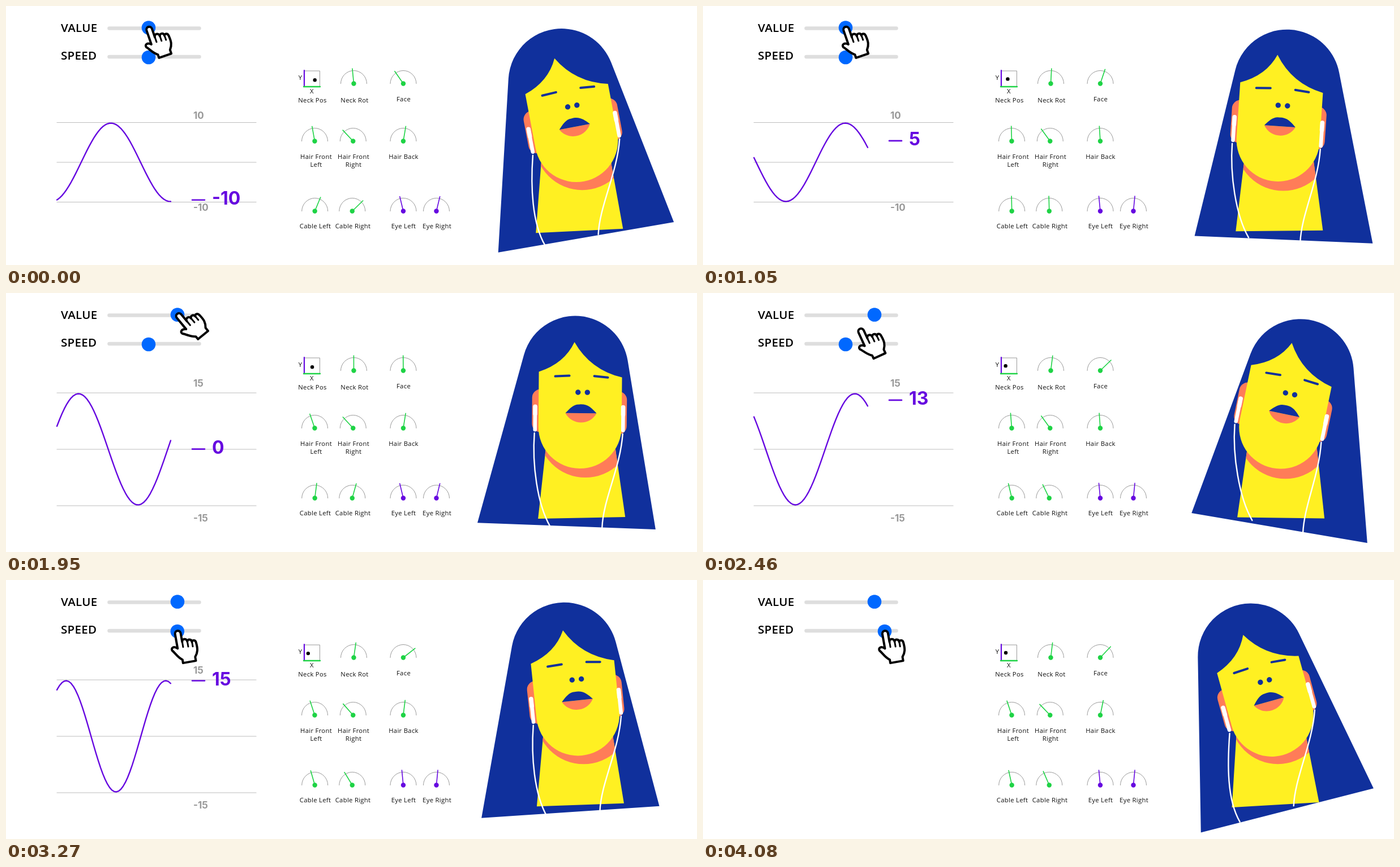
Animation of 1221x459 px, one loop 4110 ms. Source, as an HTML page with a canvas:

```html
<!DOCTYPE html>
<html>
<head>
<meta charset="utf-8">
<title>Sine rig</title>
<style>
html, body { margin: 0; width: 100%; height: 100%; overflow: hidden; background: #fff; }
canvas { display: block; }
</style>
</head>
<body>
<canvas id="stage" width="1221" height="459"></canvas>
<script>
const ctx = document.getElementById('stage').getContext('2d');
const LOOP = 4110, STEP = 30, TAU = Math.PI * 2, DEG = Math.PI / 180;
const OMEGA = TAU / 1533, BOOST = 0.36, GRAPH_END = 3960;
const VALUE_LAG = 0.17, HEAD_LAG = 0.08;
const BLUE = '#10309c', YELLOW = '#fff022', ORANGE = '#ff7c58';
const GREEN = '#1ed345', PURPLE = '#6608e0', DOT = '#0068ff';

const { sin, cos, round, max, min } = Math;
const lerp = (a, b, p) => a + (b - a) * p;
const clamp = x => max(0, min(1, x));
const ease = (t, from, to) => (1 - cos(Math.PI * clamp((t - from) / (to - from)))) / 2;

function fill(color, path) {
  ctx.beginPath();
  path();
  ctx.fillStyle = color;
  ctx.fill();
}

function stroke(color, width, path) {
  ctx.beginPath();
  path();
  ctx.strokeStyle = color;
  ctx.lineWidth = width;
  ctx.stroke();
}

function poly(...xy) {
  for (let i = 0; i < xy.length; i += 2) ctx.lineTo(xy[i], xy[i + 1]);
}

const line = (color, width, ...xy) => stroke(color, width, () => poly(...xy));
const disc = (color, x, y, r) => fill(color, () => ctx.arc(x, y, r, 0, TAU));

function text(str, x, y, font, color = '#111', align = 'left', spacing = 0) {
  ctx.font = font;
  ctx.fillStyle = color;
  ctx.textAlign = align;
  ctx.letterSpacing = spacing + 'px';
  ctx.fillText(str, x, y);
}

const label = (str, x, y) =>
  text(str, x, y, '11.3px "Open Sans", sans-serif', '#111', 'center', 0.3);

function placed(x, y, degrees, draw) {
  ctx.save();
  ctx.translate(x, y);
  ctx.rotate(degrees * DEG);
  draw();
  ctx.restore();
}

// All rig values at one moment; each part counts the speed boost from its own origin.
function pose(t) {
  const speed = ease(t, 2950, 3560);
  const phase = origin => OMEGA * (t + 5 + BOOST * speed * (t - origin));
  const amp = lerp(10, 15, ease(t, 1450, 1900));
  const wave = phase(0), head = phase(2720), hair = phase(1800);
  return {
    t, speed, amp, wave, hair,
    value: -amp * cos(wave - VALUE_LAG),
    tilt: -amp * cos(head - HEAD_LAG) - 0.7,
    sway: amp * sin(head + 0.25),
  };
}

function slider(name, x, y, dotY, baseline) {
  text(name, 97, baseline, '600 20.5px "Open Sans", sans-serif', '#000', 'left', 0.3);
  line('#dedede', 6.5, 182.5, y, 341.5, y);
  disc(DOT, x, dotY, 12.3);
}

function hand(x, y, angle) {
  placed(x, y, angle, () => {
    const path = () => {
      ctx.moveTo(-5, 31);
      ctx.lineTo(-5, 5);
      ctx.arc(0, 5, 5, Math.PI, 0);
      ctx.lineTo(5, 21);
      ctx.bezierCurveTo(5, 15, 14, 15, 14, 22);
      ctx.bezierCurveTo(15, 17, 22, 18, 22, 24);
      ctx.bezierCurveTo(23, 20, 29, 21, 29, 27);
      ctx.bezierCurveTo(30, 38, 29, 44, 23, 51);
      ctx.lineTo(23, 58);
      ctx.lineTo(0, 58);
      ctx.lineTo(0, 52);
      ctx.bezierCurveTo(-8, 46, -10, 39, -15, 33);
      ctx.bezierCurveTo(-17, 28, -11, 25, -5, 31);
      ctx.closePath();
    };
    fill('#fff', path);
    stroke('#000', 4, path);
    line('#000', 3, 5, 20, 5, 30);
    line('#000', 3, 14, 22, 14, 31);
    line('#000', 3, 22, 24, 22, 32);
  });
}

function controls({ t }) {
  const valueX = lerp(252, 303, ease(t, 1150, 1870));
  const speedX = lerp(252, 321, ease(t, 2830, 3500));
  const switched = ease(t, 2230, 2690);
  slider('VALUE', valueX, 39.5, 38.5, 45.5);
  slider('SPEED', speedX, 90, 91, 95);
  hand(lerp(valueX - 0.5, speedX, switched), lerp(37, 90, switched),
    lerp(-19 - 0.4 * (valueX - 252), -10, switched));
}

function graph({ t, speed, amp, wave, value }) {
  if (t >= GRAPH_END) return;
  const mid = 277, grown = (amp - 10) / 5, height = lerp(70.5, 100, grown);
  for (const y of [mid - height, mid, mid + height]) line('#bdbdbd', 1.2, 90, y, 442, y);

  const bold = '700 17px Inter, sans-serif', limit = round(amp);
  text(limit, 331, mid - height - lerp(6.5, 11.5, grown), bold, '#999');
  text(-limit, 331, mid + height + lerp(15.5, 27.5, grown), bold, '#999');

  stroke(PURPLE, 2.4, () => {
    const k = TAU / 210 * (1 + BOOST * speed);
    for (let x = 291; x > 86; x -= 4) {
      const px = max(90, x);
      ctx.lineTo(px, mid + height * 0.985 * cos(wave - (291 - px) * k));
    }
  });

  const y = mid - 1.5 - height * 0.98 * value / amp;
  line(PURPLE, 2.6, 329, y, 351, y);
  text(Math.trunc(value * 1.012) || 0, 364, y + 8.5, '700 32px Inter, sans-serif', PURPLE);
}

function gauge(x, y, angle, color = GREEN) {
  stroke('#999', 1, () => ctx.arc(x, y, 23, Math.PI, 0));
  placed(x, y, angle, () => line(color, 1.6, 0, 0, 0, -26.5));
  disc(color, x, y, 4.2);
}

function gauges({ wave, hair, value, speed }) {
  line('#999', 1, 527, 115, 554.5, 115, 554.5, 143);
  line(PURPLE, 2.2, 527, 114, 527, 143);
  line(GREEN, 2.4, 526, 143, 555, 143);
  disc('#000', 541 - 0.48 * value, 131 + 2 * cos(2 * wave - 4.88), 3.2);
  label('Y', 520, 131);
  label('X', 540.5, 155);

  gauge(614.5, 137.5, 0.55 * value);
  gauge(702, 137.5, 3.5 * value);

  const c = cos(hair), s = sin(hair);
  gauge(545.5, 239.5, -10 - 9 * s);
  gauge(613.3, 239.5, -40 - 3 * c - 3 * s);
  gauge(702, 239.5, 4 + 5.5 * c + 6 * s);

  gauge(545.7, 363.5, 7 - 1.55 * value);
  gauge(611.8, 363.5, 15 - 3.1 * value);

  const blink = ease(cos(wave - 0.87), 0.3, 0.64) * (1 - speed);
  const eye = 5.5 + 8 * blink;
  gauge(702, 363.5, -eye, PURPLE);
  gauge(760.5, 363.5, eye, PURPLE);

  label('Neck Pos', 541.5, 171);
  label('Neck Rot', 616, 171);
  label('Face', 702.5, 168.5);
  label('Hair Front', 548, 271);
  label('Left', 548, 285);
  label('Hair Front', 614, 271);
  label('Right', 614, 285);
  label('Hair Back', 702.5, 271);
  label('Cable Left', 546.5, 394);
  label('Cable Right', 613, 394);
  label('Eye Left', 702.5, 394);
  label('Eye Right', 761.5, 394);
}

// Hull of the skull circle and the two swinging hem corners.
function hairBack({ tilt, sway }) {
  const r = 94;
  const cx = 1014 + 2.85 * tilt - 0.7 * sway;
  const cy = 134.5 + 0.25 * tilt + 0.02 * tilt * tilt;
  const hemX = 1014.5 - 1.4 * tilt - 1.7 * sway, hemY = 413 + 0.3 * tilt;
  const hem = (0.95 * tilt + 0.12 * sway) * DEG;
  const dx = 157.5 * cos(hem), dy = 157.5 * sin(hem);
  const tangent = (x, y, side) =>
    Math.atan2(y - cy, x - cx) + side * Math.acos(r / Math.hypot(x - cx, y - cy));
  fill(BLUE, () => {
    ctx.arc(cx, cy, r, tangent(hemX - dx, hemY - dy, 1), tangent(hemX + dx, hemY + dy, -1));
    poly(hemX + dx, hemY + dy, hemX - dx, hemY - dy);
  });
}

function neck({ tilt }, shadow) {
  const top = 1015 + 0.7 * tilt, base = 1017 + 0.35 * tilt;
  const slope = 77 * sin((0.15 * tilt - 1.1) * DEG);
  const path = () => poly(top - 62, 280, top - 50, 200, top + 50, 200, top + 62, 280,
    base + 77, 398.5 + slope, base - 77, 398.5 - slope);
  fill(YELLOW, path);
  ctx.save();
  ctx.beginPath();
  path();
  ctx.clip();
  disc(ORANGE, ...shadow, 84);
  ctx.restore();
}

function face() {
  fill(YELLOW, () => {
    ctx.moveTo(-75, -73);
    ctx.quadraticCurveTo(-30, -88, -12.5, -126);
    ctx.quadraticCurveTo(16, -77, 72, -64);
    ctx.lineTo(72, 24.5);
    ctx.arc(-1.5, 24.5, 73.5, 0, Math.PI);
  });
  line(BLUE, 4, -46, -65, -21, -66.3);
  line(BLUE, 4, 23, -66, 47, -63.7);
  disc(BLUE, -5.5, -37, 4.7);
  disc(BLUE, 11, -37, 4.7);
  fill(ORANGE, () => {
    ctx.moveTo(-27.5, 0);
    ctx.bezierCurveTo(-16, 22, 16, 22, 27.5, 0);
  });
  fill(BLUE, () => {
    ctx.moveTo(-27.5, 0);
    ctx.bezierCurveTo(-20, -8, -13, -16, -3, -15.5);
    ctx.bezierCurveTo(12, -17, 19, -9, 27.5, 0);
  });
}

function ears() {
  fill(ORANGE, () => ctx.roundRect(-86.5, -42, 30, 76, 15));
  fill(ORANGE, () => ctx.roundRect(51, -39, 30, 76, 15));
}

function earbuds() {
  for (const x of [-81, 74.5]) {
    line('#fff', 6.6, x, -11, x, 30);
    line('#fff', 7.6, x, -11, x, 2);
  }
}

function cable(from, to, bend1, bend2) {
  stroke('#fff', 2.4, () => {
    ctx.moveTo(...from);
    ctx.bezierCurveTo(from[0] - 4, from[1] + bend1, to[0] + bend2[0], to[1] + bend2[1], ...to);
  });
}

function woman(rig) {
  const { tilt } = rig;
  const x = 1015.5 + tilt, y = 213 + 0.01 * tilt * tilt;
  const c = cos(tilt * DEG), s = sin(tilt * DEG);
  const onHead = (lx, ly) => [x + lx * c - ly * s, y + lx * s + ly * c];

  hairBack(rig);
  placed(x, y, tilt, ears);
  neck(rig, onHead(8, 30));
  placed(x, y, tilt, face);
  placed(x, y, tilt, earbuds);
  cable(onHead(-82, 36), [961 + 0.8 * tilt, 414 - 0.95 * tilt], 55, [-23, -40]);
  cable(onHead(74, 36), [1053 + 0.6 * tilt, 415 + 0.95 * tilt], 60, [2, -50]);
}

function frame() {
  const t = Math.floor(performance.now() % LOOP / STEP) * STEP;
  const rig = pose(t);
  ctx.fillStyle = '#fff';
  ctx.fillRect(0, 0, 1221, 459);
  ctx.lineCap = ctx.lineJoin = 'round';
  graph(rig);
  gauges(rig);
  woman(rig);
  controls(rig);
  requestAnimationFrame(frame);
}
frame();
</script>
</body>
</html>
```
